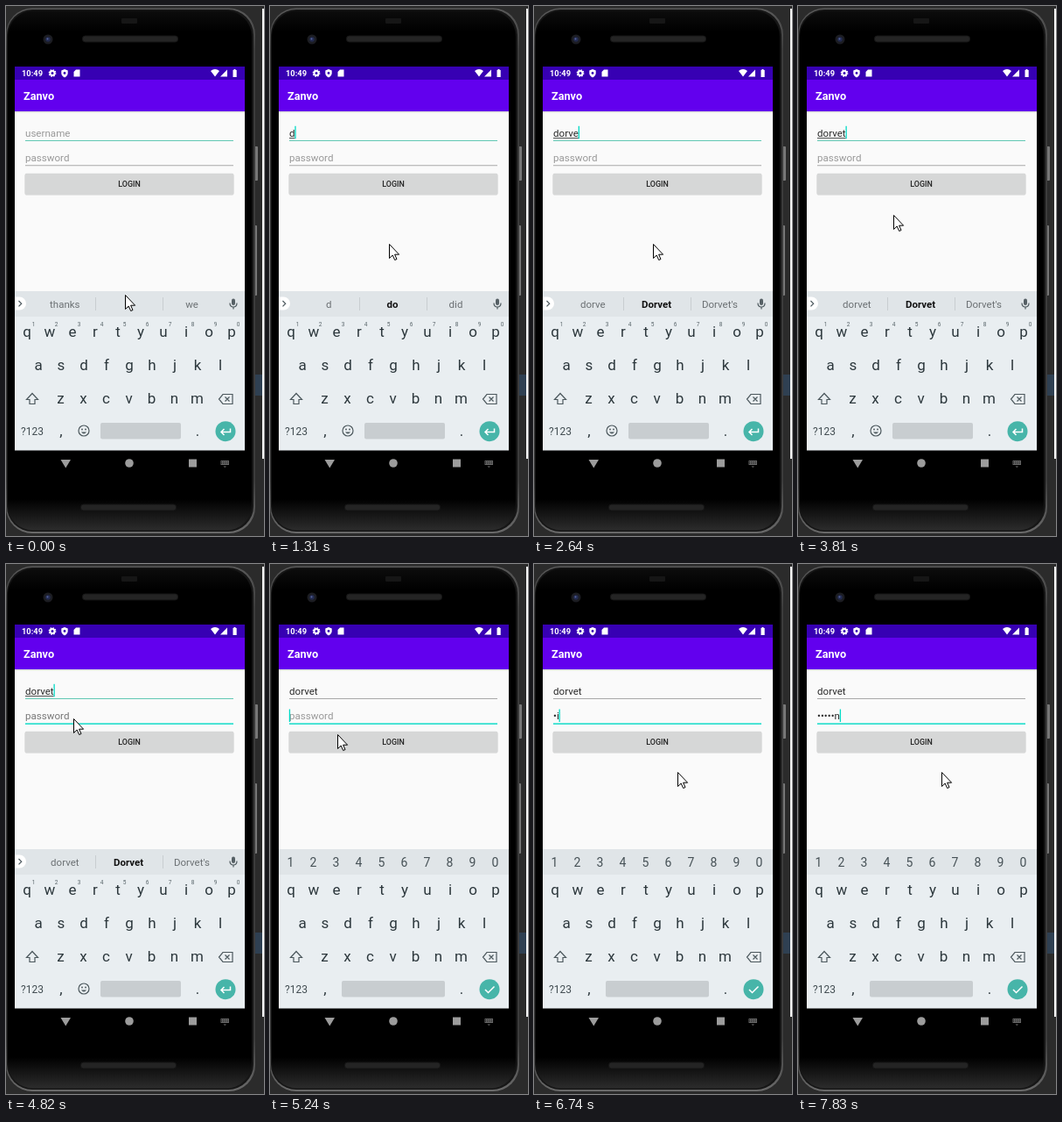
Write an HTML page that moves like this. It is 295 by 604 pixels and loops after 8 s.

```html
<!DOCTYPE html>
<html lang="en">
<head>
<meta charset="utf-8">
<title>Login screen</title>
<style>
html, body { margin: 0; width: 100%; height: 100%; overflow: hidden; background: #2b2b2b; }
svg { display: block; width: 295px; height: 604px; font-family: Roboto, "Open Sans", sans-serif; }
.mid { text-anchor: middle; }
.key { font-size: 17px; fill: #2c373c; }
.word { font-size: 11.5px; fill: #6b7073; }
.field { font-size: 11.6px; }
.icon { fill: none; stroke: #4b575c; stroke-width: 1.2; }
</style>
</head>
<body>
<svg viewBox="0 0 295 604">
  <defs>
    <linearGradient id="shade" x2="0" y2="1">
      <stop stop-color="#ccc"/><stop offset="1" stop-color="#fafafa"/>
    </linearGradient>
    <linearGradient id="rim" x2="0" y2="1">
      <stop stop-color="#5a5a5a"/><stop offset=".08" stop-color="#3c3c3c"/>
      <stop offset=".9" stop-color="#3c3c3c"/><stop offset="1" stop-color="#6a6a6a"/>
    </linearGradient>
    <linearGradient id="body" x2="0" y2="1">
      <stop stop-color="#0c0c0c"/><stop offset=".04" stop-color="#000"/>
      <stop offset=".94" stop-color="#000"/><stop offset="1" stop-color="#2c2c2c"/>
    </linearGradient>
  </defs>

  <!-- desktop and phone body -->
  <rect width="295" height="604" fill="#2b2b2b"/>
  <rect x="284" y="420" width="9" height="24" fill="#2f4052"/>
  <rect x="293" y="3" width="2" height="513" fill="#fff"/>
  <rect x="284" y="160" width="4" height="39" rx="1" fill="#777"/>
  <rect x="284" y="250" width="3" height="80" rx="1" fill="#777"/>
  <rect y="2.500" width="285" height="598.500" rx="30" fill="url(#rim)"/>
  <rect x="1" y="4" width="282" height="595" rx="29" fill="#161616"/>
  <rect x="2" y="5.500" width="279" height="592" rx="29" fill="url(#body)"/>
  <rect x="132" y="14" width="18" height="6" rx="1" fill="#161616"/>
  <circle cx="48" cy="38" r="5.500" fill="#1c1d22"/>
  <circle cx="48" cy="38" r="2.800" fill="#232b50"/>
  <circle cx="47.500" cy="37.500" r="1" fill="#5a69a0"/>
  <rect x="87.500" y="34" width="109" height="7" rx="3" fill="#242424" stroke="#151515"/>
  <rect x="85.500" y="568" width="109" height="7" rx="3" fill="#242424" stroke="#151515"/>

  <!-- app -->
  <rect x="10" y="69" width="263" height="256" fill="#fafafa"/>
  <rect x="10" y="120" width="263" height="2" fill="url(#shade)"/>
  <rect x="10" y="69" width="263" height="15" fill="#3700b3"/>
  <rect x="10" y="84" width="263" height="36" fill="#6200ee"/>
  <g fill="#fff">
    <text x="18" y="80" font-size="9.300" font-weight="700">10:49</text>
    <circle cx="53" cy="76.500" r="2.500" fill="none" stroke="#fff" stroke-width="2"/>
    <circle cx="53" cy="76.500" r="3.800" fill="none" stroke="#fff" stroke-width="1.200" stroke-dasharray="1.600 1.380"/>
    <path d="M67 72l3.700 1.500v3q0 3-3.700 5-3.700-2-3.700-5v-3z"/>
    <path d="M80 72.500h4.500v8h-7v-5.500z"/>
    <path d="M234 74q5-4 10 0l-5 6.500zM253 72.500v8h-8zM259.500 73h1v-1h2v1h1.200v8h-4.200z"/>
    <text x="20" y="107" font-size="12.700" font-weight="700">Zanvo</text>
  </g>
  <circle cx="67" cy="76.500" r="1.400" fill="#3700b3"/>

  <rect id="userLine" x="22" width="238"/>
  <rect id="passLine" x="22" width="238"/>
  <text id="user" class="field" x="22" y="149"></text>
  <text id="pass" class="field" x="22" y="177"></text>
  <rect id="compose" x="22" y="150.200" height=".9" fill="#333"/>
  <rect id="caret" width="1.300" height="14.500" fill="#03dac5"/>

  <rect x="21.500" y="191.500" width="239" height="24.300" rx="2" fill="#dedede"/>
  <rect x="21.500" y="190.700" width="239" height="24.300" rx="2" fill="#d6d7d7"/>
  <text class="mid" x="141" y="206" font-size="8.900" font-weight="500" fill="#222">LOGIN</text>

  <!-- keyboard -->
  <rect x="10" y="325" width="263" height="181.500" fill="#e9eef1"/>
  <rect x="10" y="325" width="263" height="29" fill="#e0e5e8"/>
  <g id="keys"></g>
  <g class="icon">
    <path d="M30 441.500l6.500 7h-3.500v5h-6v-5h-3.500z"/>
    <path d="M248 442.500h11v11h-11l-4.500-5.500zM250.500 445.500l5 5m0-5l-5 5"/>
  </g>
  <text class="mid" x="30" y="488.500" font-size="12" fill="#414c51">?123</text>
  <text class="mid key" x="63" y="490">,</text>
  <text class="mid key" x="219" y="490">.</text>
  <rect id="space" y="475" height="18.500" rx="2" fill="#c8cdd0"/>
  <circle cx="251" cy="484.700" r="11.500" fill="#47b5a9"/>
  <path id="action" fill="none" stroke="#fff" stroke-width="1.500"/>

  <g id="textKeys">
    <path d="M102.500 332v15M179.500 332v15" stroke="#c8cdd0"/>
    <path d="M10 331.500h5.500a7.500 7.500 0 0 1 0 15h-5.500z" fill="#fff"/>
    <path d="M14.500 336l3.200 3.200-3.200 3.200" class="icon"/>
    <rect x="258" y="333.500" width="4" height="7.500" rx="2" fill="#555f64"/>
    <path d="M256 338.500q0 4.500 4 4.500t4-4.500M260 343v2.500" class="icon"/>
    <circle cx="89" cy="484" r="6" class="icon"/>
    <path d="M86 485.500q3 4 6 0z" fill="#4b575c"/>
    <circle cx="87" cy="482.500" r=".9" fill="#4b575c"/>
    <circle cx="91" cy="482.500" r=".9" fill="#4b575c"/>
    <text class="mid word" x="67.300" y="344"></text>
    <text class="mid word" x="140" y="344" id="best"></text>
    <text class="mid word" x="212.500" y="344"></text>
  </g>
  <g id="passKeys"></g>

  <!-- navigation bar -->
  <g fill="#9c9c9c">
    <path d="M62.500 517h11.500l-5.750 9.500z"/>
    <circle cx="141" cy="521" r="4.800"/>
    <rect x="209" y="516.500" width="9" height="9"/>
  </g>
  <path d="M245.500 518h9.500v5h-9.500zM248.500 524.500h3.500l-1.750 1.500z" fill="#6c6c6c"/>
  <path d="M246 519.600h8.500M246 521.300h8.500" stroke="#000" stroke-width=".8" stroke-dasharray="1 .8"/>

  <path id="mouse" d="M.5.5v16l3.700-3.500 2.500 5.500 2.300-1-2.400-5.300h5z" fill="#fff" stroke="#000" stroke-width="1"/>
</svg>
<script>
const $ = id => document.getElementById(id);
const LOOP = 8000;
const TEAL = '#03dac5', MINT = '#62c8b4', GRAY = '#949494';

// Each track holds [start time, value...] and keeps a value until the next entry.
const typed = [[0, ''], [1310, 'd'], [1600, 'do'], [1970, 'dor'], [2520, 'dorv'], [2640, 'dorve'], [2890, 'dorvet']];
const hints = [
  [0, 'thanks', 'I', 'we'], [1310, 'd', 'do', 'did'], [1600, 'do', 'dog', 'day'],
  [2090, 'dor', 'door', 'dory'], [2640, 'dorve', 'Dorvet', "Dorvet's"], [2890, 'dorvet', 'Dorvet', "Dorvet's"]
];
const secret = 'silhan';
const taps = [[0, 0], [6460, 1], [6740, 2], [7170, 3], [7290, 4], [7690, 5], [7830, 6]];
const blink = [[0, 0], [120, 1], [660, 0], [1190, 1], [3280, 0], [3810, 1], [4310, 0], [4820, 1], [5390, 0], [5920, 1]];
const path = [
  [0, 136, 329], [120, 136, 325], [240, 136, 318], [390, 136, 278], [540, 136, 271], [3660, -50, -50],
  [3810, 109, 238], [3930, 100, 224], [4050, 88, 200], [4170, 78, 178], [4310, 77, 176],
  [5240, 77, 194], [5390, 96, 216], [5540, 124, 226], [5660, 149, 234], [5780, 164, 237]
];
const at = (track, t) => track.findLast(e => e[0] <= t).slice(1);

const row = (chars, x, y, style) => [...chars].map((c, i) =>
  `<text class="mid key" x="${x + 26 * i}" y="${y}" style="${style || ''}">${c}</text>`).join('');
$('keys').innerHTML = row('qwertyuiop', 24, 377) + row('asdfghjkl', 37, 415) + row('zxcvbnm', 62.5, 453);
$('textKeys').insertAdjacentHTML('beforeend', row('1234567890', 31.5, 365, 'font-size:6.5px;fill:#59656a'));
$('passKeys').innerHTML = row('1234567890', 23.5, 345, 'font-size:14px;fill:#465156');
const words = document.querySelectorAll('.word');

function set(el, attrs) {
  for (const k in attrs) el.setAttribute(k, attrs[k]);
}

function fill(el, text, hint, hintColor) {
  el.textContent = text || hint;
  el.setAttribute('fill', text ? '#2b2b2b' : hintColor);
  return text ? el.getComputedTextLength() : 0;
}

function draw(t) {
  const tapped = t >= 4820, inPass = t >= 4940, passKeys = t >= 5090;
  const [n] = at(taps, t);
  const dots = n ? '•'.repeat(n - 1) + secret[n - 1] : '';
  const userW = fill($('user'), at(typed, t)[0], 'username', '#999');
  const passW = fill($('pass'), dots, 'password', tapped && !inPass ? '#777' : '#999');

  set($('userLine'), { y: 153, height: inPass ? .8 : 1, fill: inPass ? GRAY : MINT });
  set($('passLine'), { y: 181.4, height: tapped ? 1.4 : .8, fill: tapped ? TEAL : GRAY });
  set($('compose'), { width: inPass ? 0 : userW });
  set($('caret'), {
    x: 21.8 + (inPass ? passW : userW),
    y: inPass ? 165.5 : 136.8,
    opacity: at(blink, t)[0]
  });

  at(hints, t).forEach((w, i) => words[i].textContent = w);
  $('best').style.cssText = t >= 1310 ? 'font-weight:700;fill:#111' : '';
  $('textKeys').style.display = passKeys ? 'none' : '';
  $('passKeys').style.display = passKeys ? '' : 'none';
  set($('space'), passKeys ? { x: 82, width: 118 } : { x: 108, width: 92 });
  set($('action'), { d: passKeys ? 'M246 485l3.500 3.500 7-7' : 'M256.500 481.500v4h-10.500m3.500-3.500l-3.500 3.500 3.500 3.500' });

  set($('mouse'), { transform: `translate(${at(path, t)})` });
}

function tick() {
  draw(performance.now() % LOOP);
  requestAnimationFrame(tick);
}
tick();
</script>
</body>
</html>
```
